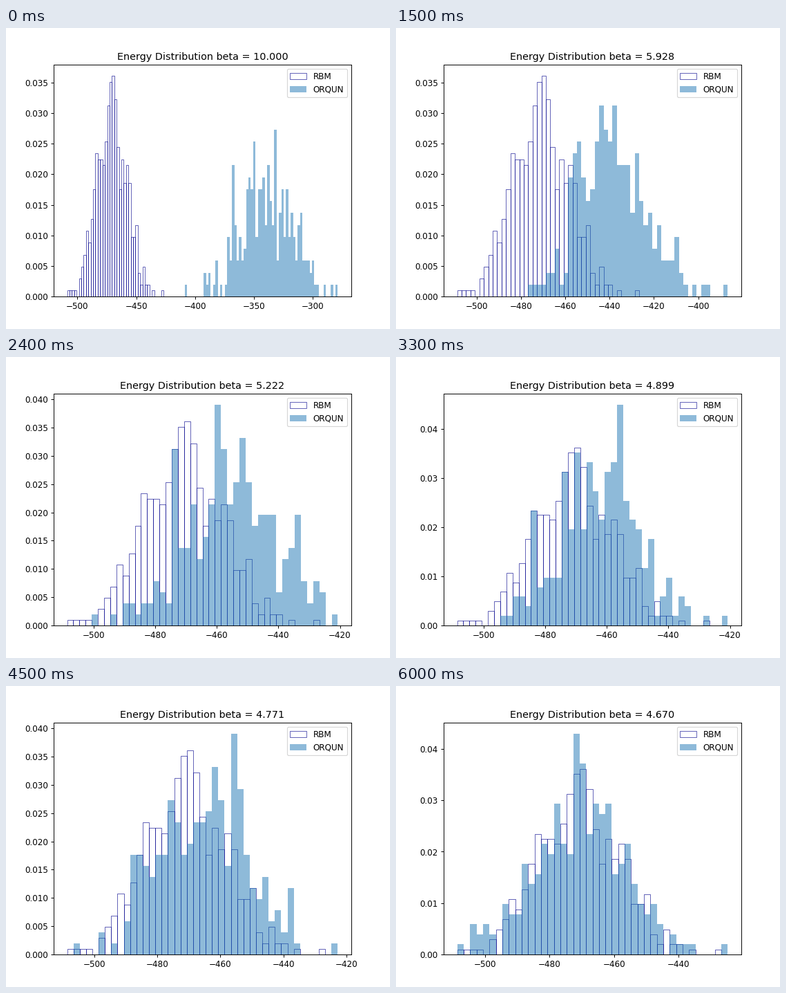
Recreate the animation shown at these times as a matplotlib script. Size 556 px wide and 435 px high, loop 6300 ms.

```python
import numpy as np
import matplotlib.pyplot as plt
from matplotlib.animation import FuncAnimation

W, H, DPI = 556, 435, 86
STEPS = 21
LEFT, BIN = -508.7, 2            # first bin edge and bin width
FLOOR, FINAL = 4.6, 4.67         # decay asymptote and final value of beta

# Key points: step, beta, number of bins, tallest bin
KEYS = np.array([
    (0, 10.000, 115, 14),
    (5, 5.928, 61, 16),
    (8, 5.222, 44, 20),
    (11, 4.899, 44, 23),
    (15, 4.771, 43, 20),
    (18, 4.695, 54, 23),
    (19, 4.670, 42, 22),
])
key_step, key_beta, key_bins, key_peak = KEYS.T


def draw_counts(seed, size, mean, spread, bins, peak):
    """Bin a seeded normal sample, with a given peak and a lone last value."""
    draws = np.random.default_rng(seed).normal(mean, spread, size)
    counts = np.histogram(draws, np.arange(bins + 1))[0]
    top = counts.argmax()
    counts = np.minimum(counts, peak)
    counts[top] = peak
    counts[-1] = 1
    return counts


def beta_at(step):
    """Beta decays geometrically between key points."""
    return FLOOR + np.exp(np.interp(step, key_step, np.log(key_beta - FLOOR)))


def sample_at(step, beta):
    """The sample moves left and narrows as beta falls."""
    excess = beta - FINAL
    bins = round(np.interp(beta, key_beta[::-1], key_bins[::-1]))
    peak = round(np.interp(step, key_step, key_peak))
    return draw_counts(step, 256, 20 + 12.1 * excess, 6.6 + 0.8 * excess,
                       bins, peak)


def bars(counts, **style):
    edges = LEFT + BIN * np.arange(len(counts))
    ax.bar(edges, counts, BIN, align="edge", **style)


def update(step):
    beta = beta_at(step)
    ax.clear()
    bars(model / (512 * BIN), fc="none", ec="darkblue", lw=0.5, label="RBM")
    bars(sample_at(step, beta) / (256 * BIN), color="C0", alpha=0.5,
         label="ORQUN")
    ax.set_title(f"Energy Distribution beta = {beta:.3f}")
    ax.legend(loc="upper right")
    return ax.get_children()


model = draw_counts(7, 512, 19.7, 6.6, 41, 37)
model[0] = 1

fig, ax = plt.subplots(figsize=((W + 0.01) / DPI, (H + 0.01) / DPI), dpi=DPI)
fig.subplots_adjust(left=69 / W, right=500 / W, bottom=47 / H, top=382 / H)

anim = FuncAnimation(fig, update, frames=STEPS, interval=300, repeat=True)
plt.show()
```
